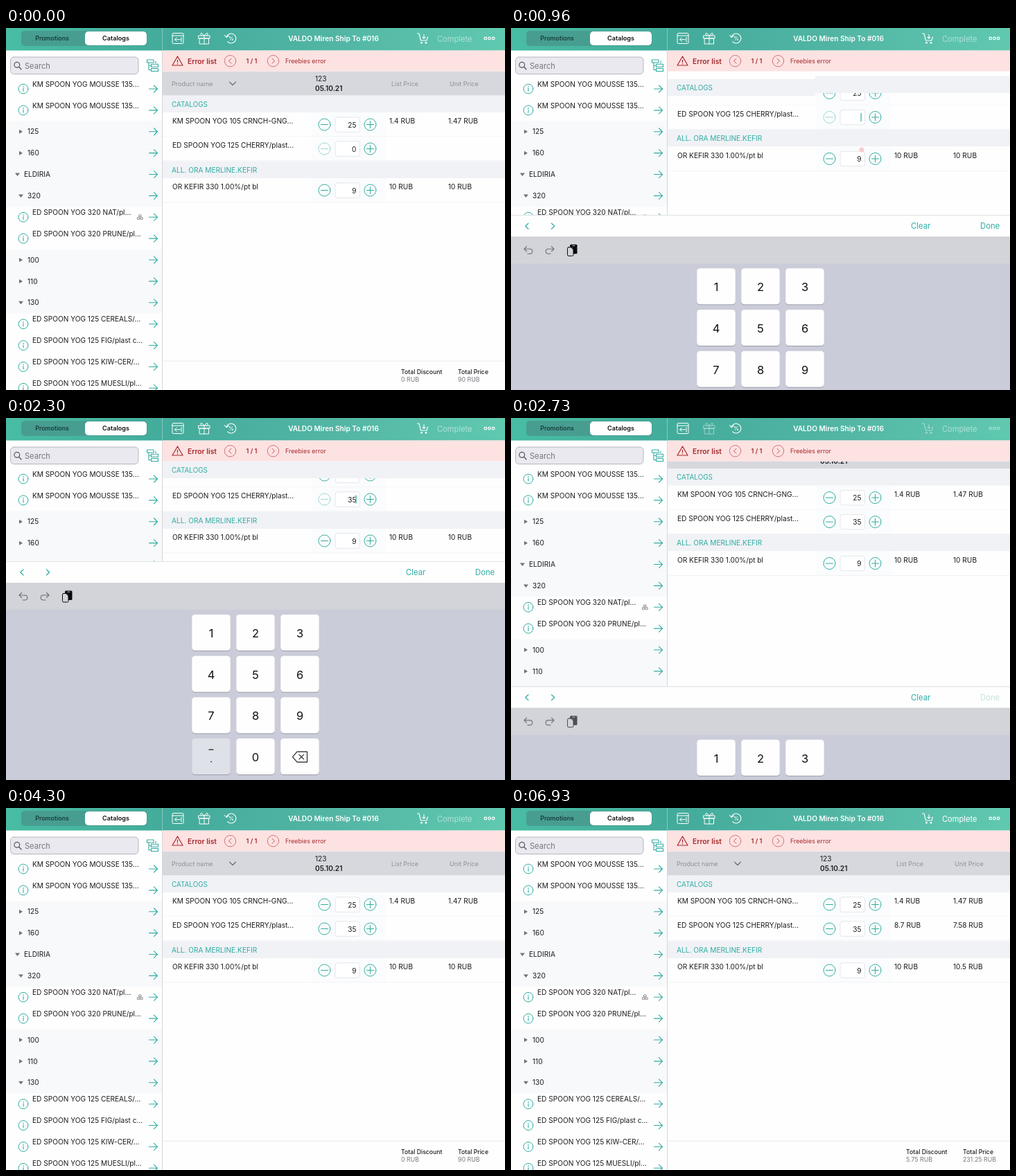
Write an HTML page with a canvas that moves like this. It is 720 px wide and 523 px high and loops after 7000 ms.

```html
<!DOCTYPE html>
<html lang="en">
<head>
<meta charset="utf-8">
<title>Order entry</title>
<style>
html, body { margin: 0; width: 100%; height: 100%; overflow: hidden; background: #fff; }
canvas { display: block; width: 720px; height: 523px; }
</style>
</head>
<body>
<canvas id="stage"></canvas>
<script>
const W = 720, H = 523, LOOP = 7000;
const TEAL = '#30aca2', RED = '#a52a2c', INK = '#1c1c1e', LINE = '#eff0f3';
const canvas = document.getElementById('stage');
const c = canvas.getContext('2d');
const dpr = window.devicePixelRatio || 1;
canvas.width = W * dpr;
canvas.height = H * dpr;

// y is the middle of the capital letters
function text(s, x, y, size = 10.15, color = INK, weight = 400, align = 'left') {
  c.font = `${weight} ${size}px Inter, Roboto, sans-serif`;
  c.textAlign = align;
  c.fillStyle = color;
  c.fillText(s, x, y + size * 0.364);
}
function box(x, y, w, h, color) {
  c.fillStyle = color;
  c.fillRect(x, y, w, h);
}
function round(x, y, w, h, r, fill, stroke) {
  c.beginPath();
  c.roundRect(x, y, w, h, r);
  if (fill) { c.fillStyle = fill; c.fill(); }
  if (stroke) { c.strokeStyle = stroke; c.lineWidth = 1; c.stroke(); }
}
function path(color, width, ...lines) {
  c.strokeStyle = color;
  c.lineWidth = width;
  c.lineCap = c.lineJoin = 'round';
  c.beginPath();
  for (const l of lines)
    for (let i = 0; i < l.length; i += 2) i ? c.lineTo(l[i], l[i + 1]) : c.moveTo(l[0], l[1]);
  c.stroke();
}
function ring(x, y, r, color, width = 1, from = 0, to = 7) {
  c.strokeStyle = color;
  c.lineWidth = width;
  c.beginPath();
  c.arc(x, y, r, from, Math.min(to, from + Math.PI * 2));
  c.stroke();
}
function disc(x, y, r, color) {
  c.fillStyle = color;
  c.beginPath();
  c.arc(x, y, r, 0, Math.PI * 2);
  c.fill();
}
function clip(x, y, w, h, draw) {
  c.save();
  c.beginPath();
  c.rect(x, y, w, h);
  c.clip();
  draw();
  c.restore();
}
function at(x, y, draw, alpha = 1) {
  c.save();
  c.translate(x, y);
  c.globalAlpha = alpha;
  draw();
  c.restore();
}

// ---- timeline ----
const OPEN = 812, CLOSE = 2645, SLIDE = 450;
const ease = (t, start) => 1 - (1 - Math.min(1, Math.max(0, (t - start) / SLIDE))) ** 4;

function stateAt(t) {
  const closing = t >= CLOSE;
  const p = closing ? 1 - ease(t, CLOSE) : ease(t, OPEN);
  const editing = t >= 780 && !closing;
  let qty = '0';
  if (t >= 780) qty = '';
  if (t >= 1550) qty = '3';
  if (t >= 1950) qty = '35';
  return { t, p, closing, editing, qty, dim: t >= CLOSE && t < 3550, priced: t >= 5700 };
}

// ---- side list ----
const SIDE = [
  [0, 'KM SPOON YOG MOUSSE 135...'], [0, 'KM SPOON YOG MOUSSE 135...'],
  [2, '125'], [2, '160'], [1, 'ELDIRIA', true], [2, '320', true],
  [0, 'ED SPOON YOG 320 NAT/pl...'], [0, 'ED SPOON YOG 320 PRUNE/pl...'],
  [2, '100'], [2, '110'], [2, '130', true],
  [0, 'ED SPOON YOG 125 CEREALS/...'], [0, 'ED SPOON YOG 125 FIG/plast c...'],
  [0, 'ED SPOON YOG 125 KIW-CER/...'], [0, 'ED SPOON YOG 125 MUESLI/pl...']
];

function sidebar() {
  box(0, 32, 225, H, '#fefefe');
  SIDE.forEach(([level, label, open], i) => {
    const y = 88 + i * 30.88;
    if (level) {
      box(0, y - 15.4, 225, 30.9, '#f7f9fb');
      const x = level === 1 ? 16.5 : 21.5;
      c.fillStyle = '#6f7276';
      c.beginPath();
      if (open) { c.moveTo(x - 3.5, y - 2); c.lineTo(x + 3.5, y - 2); c.lineTo(x, y + 2.5); }
      else { c.moveTo(x - 2.5, y - 3); c.lineTo(x + 2.5, y); c.lineTo(x - 2.5, y + 3); }
      c.fill();
      text(label, x + 9.5, y);
    } else {
      ring(25, y, 6.9, TEAL);
      path(TEAL, 1.1, [25, y - 0.8, 25, y + 3.2]);
      disc(25, y - 3, 0.8, TEAL);
      text(label, 38, y - 7);
    }
    path(TEAL, 1.1, [206.5, y, 218.5, y], [213.5, y - 5, 218.5, y, 213.5, y + 5]);
  });
  c.lineWidth = 0.8;
  c.strokeStyle = '#777';
  for (const [x, y] of [[192, 270], [189.8, 273.8], [194.2, 273.8]]) c.strokeRect(x, y, 3, 2.6);

  round(6.5, 42, 184.5, 24.5, 5, '#e9e9ef', '#b6b7bf');
  ring(15.8, 53.3, 3.9, '#55575c', 1.2);
  path('#55575c', 1.3, [18.7, 56.3, 22, 59.7]);
  text('Search', 27, 54.5, 11.1, '#77787e');
  at(211, 54, () => {
    c.strokeStyle = TEAL;
    c.lineWidth = 1.1;
    c.strokeRect(-7.5, -8, 9.5, 4);
    c.strokeRect(-1.5, -1.7, 10, 4);
    c.strokeRect(-1.5, 4.5, 10, 4);
    path(TEAL, 1.1, [-5, -4, -5, 6.5, -1.5, 6.5], [-5, 0.3, -1.5, 0.3], [5, -6, 5, -3.5]);
  });
  box(225, 32, 1, H, '#d5d7db');
}

// ---- top bars ----
function topBar(s) {
  const g = c.createLinearGradient(0, 0, W, 20);
  g.addColorStop(0, '#48bda4');
  g.addColorStop(0.33, '#43ab9b');
  g.addColorStop(0.65, '#52b5a4');
  g.addColorStop(1, '#60c9af');
  box(0, 0, W, 32.5, g);
  box(225, 0, 1, 32.5, 'rgba(255,255,255,.35)');
  round(22, 4, 182, 22, 5, '#489d91');
  round(114, 5, 89, 20, 5, '#fff');
  text('Promotions', 66.5, 15, 8.95, '#10332e', 500, 'center');
  text('Catalogs', 158.5, 15, 9.05, '#111', 600, 'center');
  text('VALDO Miren Ship To #016', 472.5, 15.5, 10.15, '#fff', 600, 'center');
  text('Complete', 622, 15.5, 11.1, s.priced ? '#fff' : 'rgba(255,255,255,.5)');

  const w = '#fff', off = s.dim ? 0.45 : 1;
  at(248, 15, () => {
    round(-8, -7.5, 16, 15, 1.5, null, w);
    path(w, 1, [-8, -4, 8, -4], [-4.5, 1.7, 3.5, 1.7], [-1.7, -1, -4.5, 1.7, -1.7, 4.4], [5, -1.5, 5, 5]);
  });
  at(286, 15, () => {
    c.strokeStyle = w;
    c.lineWidth = 1;
    c.strokeRect(-8, -4, 16, 4);
    c.strokeRect(-6.5, 0, 13, 8);
    path(w, 1, [0, -4, 0, 8], [0, -4, -4, -8, -5.5, -6, -3, -4], [0, -4, 4, -8, 5.5, -6, 3, -4]);
  }, off);
  at(324, 15, () => {
    ring(0.8, 0, 7, w, 1.1, -2.8, 2.4);
    path(w, 1.1, [-8.5, -4.5, -6, -1.5, -2.8, -4]);
    text('%', 1, 0, 7.5, w, 600, 'center');
  });
  at(601, 15, () => {
    path(w, 1.1, [-7.5, -7, -5, -7, -2.5, 3, 6, 3, 7.5, -2], [2, -5.5, 2, 0], [0, -1.7, 2, 0.2, 4, -1.7]);
    disc(-1.5, 6.3, 1.4, w);
    disc(5, 6.3, 1.4, w);
  }, off);
  at(697.5, 15, () => [-5.7, 0, 5.7].forEach(x => ring(x, 0, 1.8, w, 1.2)), off);

  box(226, 32.5, W, 30, '#fde2e2');
  path(RED, 1.2, [247.5, 41, 255, 54, 240, 54, 247.5, 41], [247.5, 46, 247.5, 49.5]);
  disc(247.5, 51.7, 0.8, RED);
  text('Error list', 262, 48, 10.3, RED, 600);
  text('1 / 1', 354.5, 48, 9.2, RED, 600, 'center');
  text('Freebies error', 403, 48, 8.85, RED);
  for (const [x, d] of [[323.5, -1], [385.5, 1]]) {
    ring(x, 47.7, 8.2, '#c9676a', 0.9);
    path('#c05458', 1, [x - d * 1.5, 44.2, x + d * 2, 47.7, x - d * 1.5, 51.2]);
  }
}

// ---- order table ----
function stepper(y, qty, faint, caret) {
  box(441, y - 17, 107, 34, '#fbfcfd');
  at(459.5, y, () => {
    ring(0, 0, 8.5, TEAL);
    path(TEAL, 1, [-5, 0, 5, 0]);
  }, faint ? 0.45 : 1);
  ring(525.5, y, 8.5, TEAL);
  path(TEAL, 1, [520.5, y, 530.5, y], [525.5, y - 5, 525.5, y + 5]);
  round(475, y - 10.7, 35.5, 21.5, 3, '#fff', '#e4e6ea');
  text(qty, 505.5, y + 0.5, 10.15, INK, 400, 'right');
  if (caret) box(504.5, y - 6, 1.2, 12, TEAL);
}
function row(y, name, list, unit, ...cell) {
  box(226, y, W, 35, '#fefefe');
  stepper(y + 17.5, ...cell);
  box(226, y + 34.5, W, 0.8, LINE);
  text(name, 240, y + 12.5);
  text(list, 553, y + 12.5);
  text(unit, 638, y + 12.5);
}

function table(s) {
  const y = -57 * s.p;
  box(226, 62, W, H, '#fefefe');
  clip(226, 62.5, W, H, () => {
    box(226, 62.5 + y, W, 35, '#d6d8dd');
    text('Product name', 239, 80.5 + y, 9.05, '#8f9096');
    path('#666a70', 1.1, [322.5, 78 + y, 327, 82.5 + y, 331.5, 78 + y]);
    text('123', 446, 73 + y);
    text('05.10.21', 446, 87 + y, 10.15, INK, 600);
    text('List Price', 556, 80.5 + y, 8.95, '#8f9096');
    text('Unit Price', 640, 80.5 + y, 9.05, '#8f9096');

    row(122 + y, 'KM SPOON YOG 105 CRNCH-GNG...', '1.4 RUB', '1.47 RUB', '25');
    row(157 + y, 'ED SPOON YOG 125 CHERRY/plast...', s.priced ? '8.7 RUB' : '', s.priced ? '7.58 RUB' : '',
      s.qty, !s.closing, s.editing);
    box(226, 192.5 + y, W, 24.5, '#f0f2f6');
    text('ALL. ORA MERLINE.KEFIR', 239, 205 + y, 10.15, TEAL);
    row(217 + y, 'OR KEFIR 330 1.00%/pt bl', '10 RUB', s.priced ? '10.5 RUB' : '10 RUB', '9');

    // the pinned heading: both panes settle at slightly different speeds while opening
    const natural = Math.max(62.5, 97.5 + y);
    const left = s.closing ? natural : 97.5 - 35 * s.p ** 1.75;
    const right = s.closing ? natural : 97.5 - 35 * s.p;
    box(226, natural, 213, left - natural, '#fefefe');
    box(439, natural, W, right - natural, '#fefefe');
    box(226, left, 213, 24.5, '#f0f2f6');
    box(439, right, W, 24.5, '#f0f2f6');
    text('CATALOGS', 239, left + 12.7, 9.9, TEAL);
  });

  box(226, 481, W, 42, '#fefefe');
  box(226, 480.7, W, 0.8, '#e3e4e8');
  text('Total Discount', 570, 496.5, 8.7, INK, 500);
  text('Total Price', 652, 496.5, 8.7, INK, 500);
  text(s.priced ? '5.75 RUB' : '0 RUB', 570, 508, 8.8, '#77787e');
  text(s.priced ? '231.25 RUB' : '90 RUB', 652, 508, 8.8, '#77787e');
}

// ---- keypad ----
function keypad(s) {
  at(0, H - 316 * s.p, () => {
    box(0, 0, W, 320, '#cbccd9');
    box(0, 31, W, 39, '#d2d4d9');
    box(0, 0, W, 31, '#fefefe');
    box(0, 0, W, 0.8, '#dcdee1');
    path(TEAL, 1.2, [25, 12, 20.8, 16, 25, 20], [58.5, 12, 62.7, 16, 58.5, 20]);
    text('Clear', 577, 16, 11.3, TEAL);
    text('Done', 677, 16, 11.3, s.closing ? '#c3e3e0' : TEAL);

    for (const [x, d] of [[25, 1], [56, -1]])
      at(x, 51, () => {
        c.scale(d, 1);
        path('#74767c', 1.2, [-2.5, -5.5, -6, -2, -2.5, 1.5], [-6, -2, 2.5, -2]);
        ring(2.3, 1.5, 3.5, '#74767c', 1.2, -Math.PI / 2, Math.PI / 2);
        path('#74767c', 1.2, [2.3, 5, -1, 5]);
      });
    at(88, 51, () => {
      const k = s.closing ? '#4c4e53' : '#0b0b0c';
      round(-3, -8.5, 10.5, 13.5, 1.5, k);
      round(-6.5, -4.5, 8.5, 12.5, 1.5, '#d2d4d9', k);
      path(k, 1.1, [-1, -4.5, 2, -1.5]);
      path('#d2d4d9', 0.9, [1, -6.7, 4, -6.7]);
    });

    for (let i = 0; i < 12; i++) {
      const x = 268.2 + (i % 3) * 64, y = 77 + Math.floor(i / 3) * 59.7;
      const mx = x + 27.8, my = y + 26.5;
      round(x, y + 1, 55.6, 52, 4.5, '#9b9da8');
      round(x, y, 55.6, 52, 4.5, i === 9 ? '#dfe1e8' : '#fefefe');
      if (i === 9) {
        path(INK, 1.2, [mx - 3, my - 10.5, mx + 3, my - 10.5]);
        disc(mx, my + 7, 0.9, INK);
      } else if (i === 11) {
        path(INK, 1.1, [mx - 10.5, my, mx - 4, my - 7.5, mx + 10.5, my - 7.5, mx + 10.5, my + 7.5,
          mx - 4, my + 7.5, mx - 10.5, my], [mx - 1, my - 3.3, mx + 5.6, my + 3.3], [mx + 5.6, my - 3.3, mx - 1, my + 3.3]);
      } else {
        text(i === 10 ? '0' : String(i + 1), mx, my + 0.5, 16.5, '#111', 400, 'center');
      }
    }
  });
}

function draw(t) {
  const s = stateAt(t);
  c.setTransform(dpr, 0, 0, dpr, 0, 0);
  box(0, 0, W, H, '#fefefe');
  sidebar();
  table(s);
  topBar(s);
  if (s.p > 0) keypad(s);
  if (t >= 740 && t < 1040)
    at(506, 176, () => disc(0, 0, 3.6, '#f8cbd1'), Math.min(1, (1040 - t) / 80));
}

const start = performance.now();
function frame() {
  draw((performance.now() - start) % LOOP);
  requestAnimationFrame(frame);
}
frame();
</script>
</body>
</html>
```
